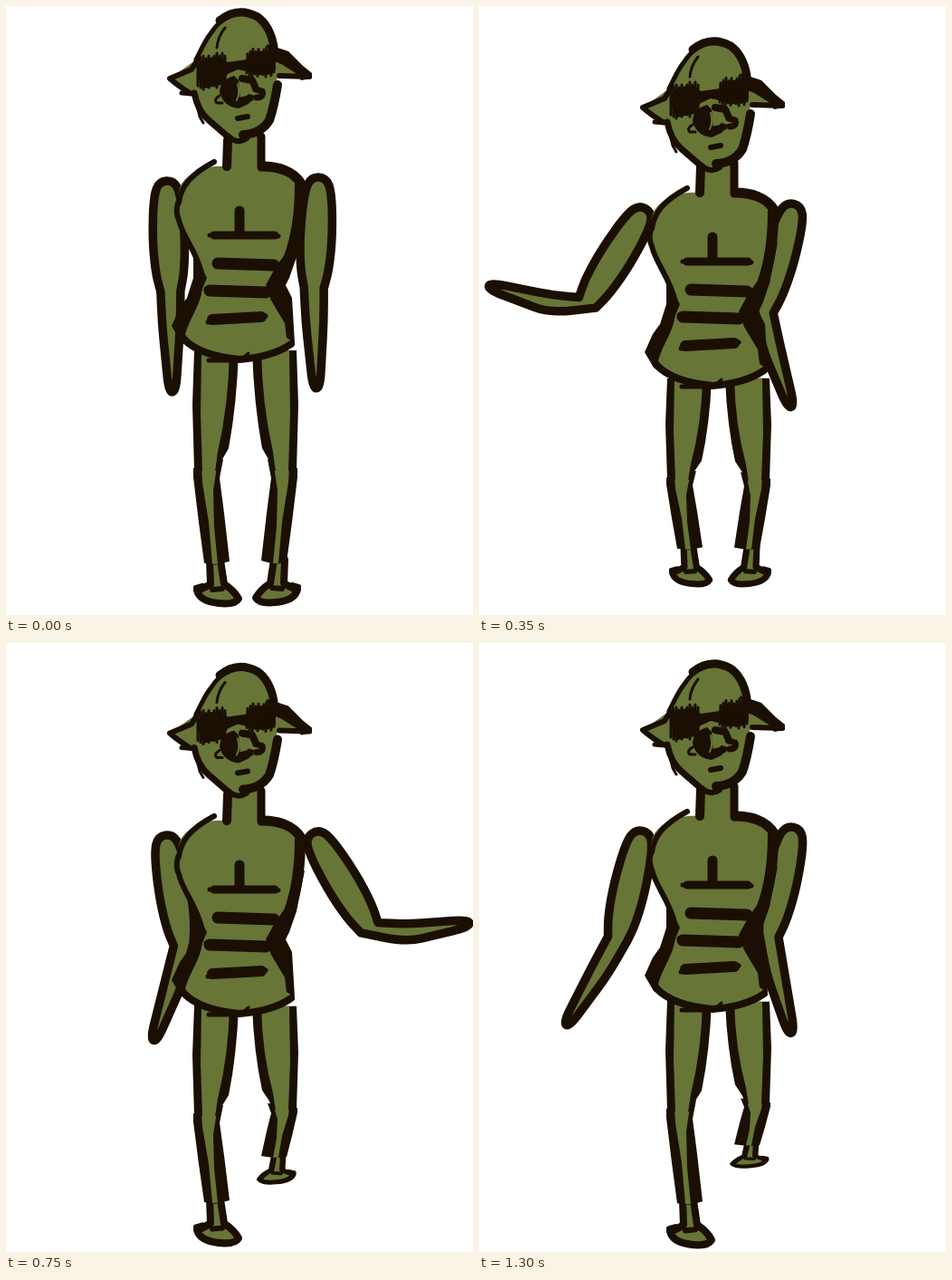
Write an HTML page with a canvas that moves like this. It is 516 px wide and 672 px high and loops after 1350 ms.

```html
<!DOCTYPE html>
<html lang="en">
<head>
<meta charset="utf-8">
<title>Walking figure</title>
<style>
html, body { margin: 0; width: 100%; height: 100%; overflow: hidden; background: #fff; }
canvas { display: block; width: 516px; height: 672px; }
</style>
</head>
<body>
<canvas id="stage" width="516" height="672"></canvas>
<script>
const ctx = document.getElementById('stage').getContext('2d');
const INK = '#1a0f02', SKIN = '#677537';
const LOOP = 1350, STEP = 50;
const RAD = Math.PI / 180;

// time, head y, torso y, left knee, left sole, right knee, right sole,
// left upper arm, left forearm, right upper arm, right forearm (degrees)
const REST = [0, 0, 0, 512, 664, 512, 663, -2, -1, 2.5, -1.5];
const POSES = [
  [50, 26, 25, 522, 668, 520, 606, 9, 30, 13, -13],
  [150, 41, 42, 537, 661, 537, 638, 3, 29, 13.5, -15],
  [350, 32, 29, 522, 642, 523, 642, 32, 100, 16, -16],
  [500, 38, 37.5, 527, 635, 532, 646, -4, 19, -3, -76],
  [750, 19.5, 19, 521, 667, 514, 598, -9.5, 17.5, -31, -93],
  [1100, 26.5, 28, 522, 631, 523, 631, 6, 42, 15, -30],
  [1300, 16, 14, 516, 669, 508, 580, 13, 31, 13, -13]
];

const slope = (i, c) => (POSES[i + 1][c] - POSES[i][c]) / (POSES[i + 1][0] - POSES[i][0]);

// Monotone tangent: flat at peaks and at both ends
function tangent(i, c) {
  if (i === 0 || i === POSES.length - 1) return 0;
  const a = slope(i - 1, c), b = slope(i, c);
  return a * b <= 0 ? 0 : 2 * a * b / (a + b);
}

function poseAt(t) {
  if (t < STEP) return REST;
  let i = 0;
  while (i < POSES.length - 2 && t >= POSES[i + 1][0]) i++;
  const p = POSES[i], q = POSES[i + 1], d = q[0] - p[0];
  const u = (t - p[0]) / d, v = 1 - u;
  return p.map((y, c) =>
    y * (1 + 2 * u) * v * v + q[c] * u * u * (3 - 2 * u) +
    d * u * v * (tangent(i, c) * v - tangent(i + 1, c) * u));
}

function fill(d, color) {
  ctx.fillStyle = color;
  ctx.fill(new Path2D(d));
}

function line(d, width, color = INK) {
  ctx.strokeStyle = color;
  ctx.lineWidth = width;
  ctx.stroke(new Path2D(d));
}

function arm(x, y, upper, fore) {
  const dir = a => [-Math.sin(a * RAD), Math.cos(a * RAD)];
  const u = dir(upper), f = dir(fore);
  const bow = 9 * Math.abs(Math.sin((fore - upper) * RAD));
  const ex = x + u[0] * 111, ey = y + u[1] * 111;
  const up = (k, w) => [x + u[0] * k - u[1] * w, y + u[1] * k + u[0] * w];
  const low = (k, w, b) => [
    ex + f[0] * k - f[1] * w + u[0] * bow * b,
    ey + f[1] * k + f[0] * w + u[1] * bow * b
  ];
  const side = s => {
    const elbow = up(110, 11 * s); // doubled, so that it stays a corner
    return [
      up(-12, 8 * s), up(4, 15 * s), up(50, 18 * s), up(88, 16 * s), elbow, elbow,
      low(36, 10 * s, 1), low(72, 7 * s, .5), low(110, 4 * s, 0)
    ];
  };
  const pts = [...side(1), ...side(-1).reverse()];
  const mid = (a, b) => [(a[0] + b[0]) / 2, (a[1] + b[1]) / 2];
  ctx.beginPath();
  ctx.moveTo(...mid(pts[pts.length - 1], pts[0]));
  pts.forEach((p, i) => ctx.quadraticCurveTo(...p, ...mid(p, pts[(i + 1) % pts.length])));
  ctx.closePath();
  ctx.fillStyle = SKIN;
  ctx.fill();
  ctx.strokeStyle = INK;
  ctx.lineWidth = 9.5;
  ctx.stroke();
}

// Draws a slice of the leg squeezed from y0..y1 into a..b
function slice(y0, y1, a, b, paint) {
  ctx.save();
  ctx.translate(0, a);
  ctx.scale(1, (b - a) / (y1 - y0));
  ctx.translate(0, -y0);
  paint();
  ctx.restore();
}

function leg(hip, knee, sole, flip) {
  const k = (sole - 540) / 123;
  const sx = .8 + .2 * Math.min(1, k ** 4), sy = .3 + .7 * k;
  const ankle = sole - 49 * sy;
  ctx.save();
  if (flip) ctx.transform(-1, 0, 0, 1, 529, 0);

  ctx.save();
  ctx.translate(235 * (1 - sx) - (flip ? 4 : 0), 0);
  ctx.scale(sx, 1);
  slice(615, 664, ankle, sole, () => {
    const foot = 'M228 610L227 640Q214 642 211 649Q216 659 235 660Q252 661 257 653Q250 645 240 640L235 610Z';
    fill(foot, SKIN);
    line('M225 612L226 638Q214 645 211 645Q214 657 235 659Q253 661 257 654Q252 645 241 638L237 612', 8);
    line('M210 642L217 640M228 644L239 643', 6);
  });
  ctx.restore();

  slice(512, 615, knee, ankle, () => {
    fill('M207 510L240 500L236 521L241 560L247 613L232 617L219 615L213 570L207 520Z', INK);
    fill('M216 508L233 508L229 535L230 575L234 616L228 616L224 570L217 526Z', SKIN);
  });
  slice(392, 512, hip, knee, () => {
    fill('M208 380L257 380Q255 440 246 488L238 502L235 513L208 513L206 440Z', INK);
    fill('M216 380L247 380Q246 440 234 492L231 514L217 514L215 450Z', SKIN);
  });
  ctx.restore();
}

function torso() {
  fill('M247 138H283V182H247Z', SKIN);
  fill('M194 196C204 181 224 175 245 177L283 177C302 180 322 184 324 198C328 222 319 250 313 275' +
    'C309 295 299 300 302 315C310 338 318 358 314 375C295 388 275 391 258 391C235 389 210 381 197 368' +
    'C190 358 194 350 202 338C208 325 212 315 216 300C212 270 194 250 190 228C188 212 191 202 194 196Z', SKIN);
  line('M245 148L244 177', 10);
  line('M282 144L282 178', 9);
  line('M191 217C193 199 205 185 230 172', 6);
  line('M284 177C300 177 318 182 326 196', 11);
  line('M325 198C325 230 321 255 313 277', 12);
  fill('M318 240L330 232L321 277L313 300L309 308L316 322L319 372L310 366L308 350L293 325L287 308L298 288L311 270Z', INK);
  line('M190 217Q187 228 191 236C195 255 211 270 217 298', 6);
  fill('M207 272L222 300L217 312C214 332 204 342 198 362L206 378L193 370L183 353L192 333L200 322L207 300Z', INK);
  line('M196 367Q214 386 258 390Q295 387 315 373', 8);
  line('M224 391H250', 5);
  line('M262 388L268 383', 3);

  line('M258 226L258 251', 11);
  line('M230 253L297 253', 9);
  line('M234 284L296 286', 13);
  line('M225 314L287 316', 13);
  line('M228 346L282 343', 12);
  line('M225 253L301 254M221 312L291 318M223 349L287 342', 5);
}

function head() {
  fill('M212 58C219 38 234 8 256 7C283 8 295 30 297 50L333 77L300 77L293 116L276 140L256 148L238 136' +
    'L214 114L207 95L199 95L181 80Z', SKIN);
  line('M210 59C216 48 222 31 240 14', 5);
  line('M236 16Q256 0 278 12Q292 22 296 45', 9);
  line('M233 46Q234 34 242 24', 3);
  line('M213 57L205 70L181 80Q190 88 203 96', 6);
  line('M194 96L205 97', 5);
  fill('M288 42L312 50L328 66L338 74L338 80L326 82L320 74L304 64L294 60Z', INK);
  line('M302 77L335 78', 6);
  line('M208 96Q212 116 224 126L246 145', 7);
  line('M211 110L214 122L218 129', 3);
  line('M300 87Q296 112 291 126Q282 141 262 142', 10);
  line('M246 144Q256 153 266 146', 6);

  // Shades with a frayed rim
  fill('M213 65Q217 56 237 56L245 62L266 59L271 51L296 49L298 70Q292 77 276 76L265 72L256 70L245 75L237 87L219 91Q211 83 213 65Z', INK);
  for (let i = 0; i < 11; i++) {
    const x = 212 + i * 3, j = (i * 7 % 5) * 1.2;
    line(`M${x} ${61 - i * .6 - j}L${x} ${88 - i * .4 + j}`, 3);
    line(`M${x + 55} ${53 - i * .4 - j}L${x + 54} ${74 - i * .1 + j}`, 3);
  }

  fill('M252 77Q237 81 236 95Q240 111 257 113L268 108L275 99L268 97L259 105L257 82Z', INK);
  line('M256 86Q259 96 255 104', 2, SKIN);
  line('M261 80L272 82L276 91', 8);
  line('M276 92L283 94Q285 101 277 101', 7);
  line('M260 104L270 102', 7);
  line('M236 99Q229 103 233 107L239 107', 3);
  line('M256 124L267 122', 6);
}

function shifted(dy, paint) {
  ctx.save();
  ctx.translate(0, dy);
  paint();
  ctx.restore();
}

function draw(t) {
  const [, headY, y, kneeL, soleL, kneeR, soleR, la, lb, ra, rb] = poseAt(t);
  ctx.fillStyle = '#fff';
  ctx.fillRect(0, 0, 516, 672);
  leg(392 + y, kneeL, soleL, false);
  leg(392 + y, kneeR, soleR, true);
  arm(178, 205 + y, la, lb);
  arm(345, 201 + y, ra, rb);
  shifted(y, torso);
  shifted(headY, head);
}

ctx.lineCap = ctx.lineJoin = 'round';
const start = performance.now();
function tick() {
  const t = (performance.now() - start) % LOOP;
  draw(Math.floor(t / STEP) * STEP);
  requestAnimationFrame(tick);
}
tick();
</script>
</body>
</html>
```
